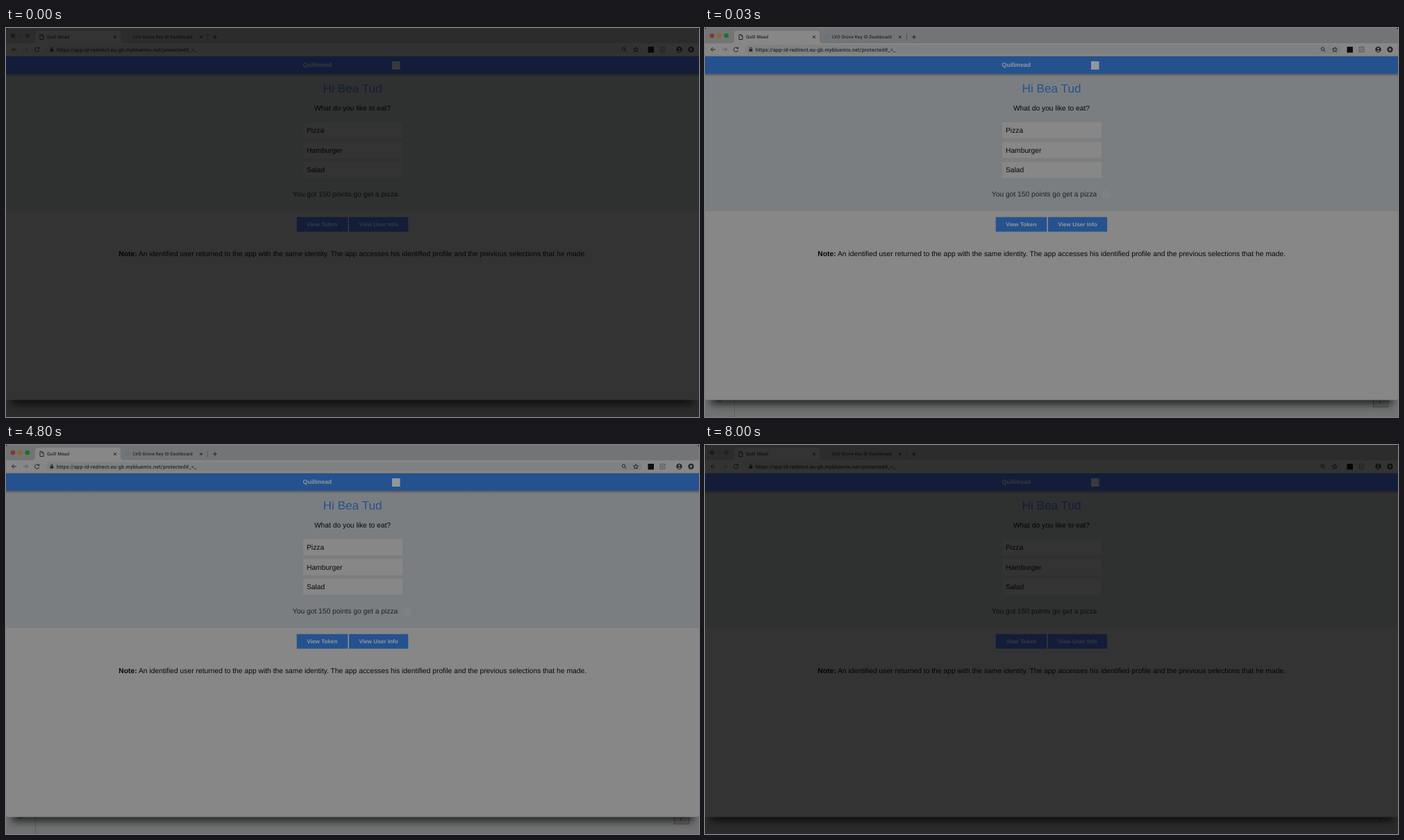
An HTML page that plays this animation: 998 px wide and 561 px high, repeating every 8.01 s.

```html
<!DOCTYPE html>
<html lang="en">
<head>
<meta charset="utf-8">
<style>
  html, body { margin: 0; width: 100%; height: 100%; overflow: hidden; background: #000; }
  svg { display: block; width: 998px; height: 561px; --blue: #25528e; --white: #878787; }
  svg.dark { --blue: #324c96; }
  text { font: 10.27px Arial, "Liberation Sans", sans-serif; fill: #080808; text-rendering: geometricPrecision; white-space: pre; }
  .mid { text-anchor: middle; }
  .bold { font-weight: bold; }
  .light { font-weight: bold; font-size: 8.2px; fill: #92979d; }
  .ui { font: 500 6.4px Roboto, sans-serif; letter-spacing: .16px; fill: #242526; }
  .url { font-size: 7.3px; letter-spacing: .17px; }
  .blue { fill: var(--blue); }
  .white { fill: var(--white); }
  .line { fill: none; stroke: #222425; stroke-width: 1; }
  .dark .tint { filter: grayscale(.85); }
  .dark .spot { display: none; }
  .veil { opacity: 0; }
  .dark .veil { opacity: .62; }
</style>
</head>
<body>
<svg id="stage" viewBox="0 0 998 561">
  <defs>
    <filter id="soft" x="-5%" y="-50%" width="110%" height="200%"><feGaussianBlur stdDeviation="6"/></filter>
    <linearGradient id="drop" x2="0" y2="1">
      <stop stop-color="#000" stop-opacity=".3"/><stop offset="1" stop-color="#000" stop-opacity="0"/>
    </linearGradient>
  </defs>

  <!-- page behind the window -->
  <rect y="530" width="998" height="31" fill="#707172"/>
  <g class="spot">
    <path d="M42.5 537v24" stroke="#555" opacity=".6"/>
    <path d="M17 537q4 3 8 0" class="line" opacity=".5"/>
    <rect x="962.5" y="532.5" width="21" height="14" fill="#6c6c6c" stroke="#505050"/>
  </g>
  <path d="M972 538v3.500" class="line"/>
  <rect x="8" y="500" width="982" height="43" opacity=".65" filter="url(#soft)"/>

  <!-- browser window -->
  <path class="white" d="M0 20H998V533q0 3.500-3.500 3.500H3.500q-3.500 0-3.500-3.500z"/>
  <path d="M0 22V3q0-3 3-3H995q3 0 3 3V22z" fill="#727476" class="tint"/>
  <path class="white" d="M37 22q5 0 5-5V8q0-4 4-4H161q4 0 4 4v9q0 5 5 5z"/>
  <g class="tint">
    <circle cx="10" cy="11" r="3.300" fill="#8a3530"/>
    <circle cx="20.500" cy="11" r="3.300" fill="#8b6a20"/>
    <circle cx="30.800" cy="11" r="3.300" fill="#1f7028"/>
  </g>
  <path d="M49 9.500h3l2 2v5h-5zM52 9.500v2h2" class="line" stroke-width=".8"/>
  <text class="ui" x="59" y="15.200">Quill Mead</text>
  <path d="M155 11l4 4m0-4l-4 4M279 11l4 4m0-4l-4 4M298 13h6m-3-3v6" class="line"/>
  <circle class="tint" cx="175" cy="13" r="3.500" fill="#607487"/>
  <text class="ui" x="183" y="15.200">LVO Grove Key ID Dashboard</text>
  <path d="M290.500 8v10" stroke="#56585a"/>

  <rect x="57" y="24.500" width="859" height="13" rx="6.500" fill="#7f8081"/>
  <path d="M15 31H8.500m3-3l-3 3l3 3" class="line"/>
  <path d="M25 31h6.500m-3-3l3 3l-3 3" class="line" opacity=".4"/>
  <path d="M47 29a3.200 3.200 0 1 0 .7 3M47.700 27.500v2.200h-2.200" class="line"/>
  <rect x="63.500" y="30.300" width="4.800" height="3.800" rx=".5" fill="#292a2b"/>
  <path d="M64.500 30.500v-1a1.400 1.400 0 0 1 2.800 0v1" class="line"/>
  <text class="ui url" x="73" y="33.500">https://app-id-redirect.eu-gb.mybluemix.net/protected#_=_</text>
  <circle cx="889.500" cy="30.300" r="2.200" class="line"/>
  <path d="M891.200 32l2.300 2.300" class="line"/>
  <path d="M907 27.700l1 2.300 2.500.2-1.900 1.600.6 2.500-2.200-1.300-2.200 1.300.6-2.500-1.900-1.600 2.500-.2z" class="line"/>
  <rect x="924.500" y="27" width="8.500" height="8.500" fill="#0d0d0d"/>
  <path d="M942 27.500h7v7h-7zM943.500 30h4m-4 2h4" class="line" opacity=".5"/>
  <circle cx="969.500" cy="31" r="4.200" fill="#252728"/>
  <circle class="white" cx="969.500" cy="29.600" r="1.300"/>
  <path class="white" d="M966.900 33.300q2.600-2.200 5.200 0q-2.600 2-5.200 0"/>
  <circle cx="986.500" cy="31" r="4.200" fill="#252728"/>
  <path class="white" d="M986.500 28.500l2.200 2.700h-1.400v2h-1.600v-2h-1.400z"/>

  <!-- app -->
  <rect class="tint" y="66" width="998" height="198" fill="#7b7e81"/>
  <rect class="blue" y="41" width="998" height="25"/>
  <rect y="66" width="998" height="4" fill="url(#drop)"/>
  <path class="tint" d="M0 40.500H998" stroke="#55687f" opacity=".6"/>
  <text class="light" style="font-size:8.600px" x="427.500" y="56">Quillmead</text>
  <rect x="556" y="48" width="11.500" height="12" fill="#92979d"/>

  <text class="mid blue" style="font-size:17.200px" x="499" y="92.500">Hi Bea Tud</text>
  <text class="mid" x="499" y="119">What do you like to eat?</text>
  <g class="white">
    <rect x="428" y="136" width="143" height="23"/>
    <rect x="428" y="164.500" width="143" height="23"/>
    <rect x="428" y="193" width="143" height="23"/>
  </g>
  <text x="433" y="151.300">Pizza</text>
  <text x="433" y="179.800">Hamburger</text>
  <text x="433" y="208.300">Salad</text>
  <text x="412.800" y="242.700" style="fill:#202224">You got 150 points go get a pizza</text>
  <circle class="spot white" cx="578" cy="240" r="6" opacity=".3"/>

  <g class="blue">
    <rect x="418.700" y="272.700" width="73.500" height="21"/>
    <rect x="494" y="272.700" width="85.200" height="21"/>
  </g>
  <text class="light mid" x="455.300" y="286.200">View Token</text>
  <text class="light mid" x="536.600" y="286.200">View User Info</text>
  <text x="162.300" y="329.300" style="font-size:10.325px"><tspan class="bold">Note:</tspan> An identified user returned to the app with the same identity. The app accesses his identified profile and the previous selections that he made.</text>

  <rect class="veil" width="998" height="561"/>
</svg>
<script>
  const LOOP = 8010, EDGE = 30;
  const stage = document.getElementById("stage");
  const start = performance.now();

  function draw() {
    const t = (performance.now() - start) % LOOP;
    stage.classList.toggle("dark", t < EDGE || t >= LOOP - EDGE);
    requestAnimationFrame(draw);
  }
  draw();
</script>
</body>
</html>
```
